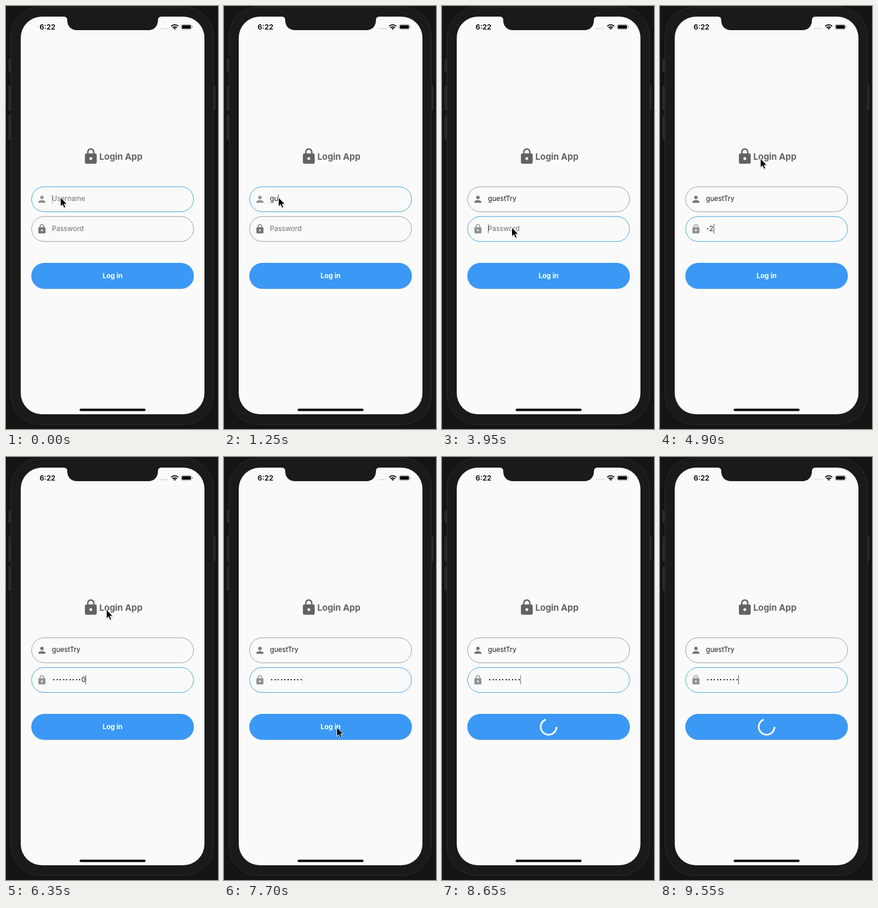
Recreate the animation shown at these times as an HTML page. Size 360 by 718 pixels, loop 9.6 s.

```html
<!DOCTYPE html>
<html lang="en">
<head>
<meta charset="utf-8">
<title>Login App</title>
<style>
  html, body { margin: 0; width: 100%; height: 100%; overflow: hidden; background: #151515; }
  #stage { position: relative; width: 360px; height: 718px; overflow: hidden; font: 11.65px Inter, Roboto, sans-serif; }
  #stage > svg { position: absolute; left: 0; top: 0; }
  text { font-weight: 700; }
  .loop { animation: 9600ms linear infinite; }

  .line { position: absolute; left: 78px; height: 43px; line-height: 43px; display: flex; align-items: center; white-space: pre; color: #1f1f1f; }
  #user { top: 306px; }
  #pass { top: 356.5px; }
  .hint { color: #707070; }
  .dot { width: 5.55px; height: 2.2px; background: radial-gradient(circle at 3px 1.1px, #222 .8px, transparent 1.3px); }
  .caret { width: 1px; height: 16px; margin-right: -1px; background: #555; animation-name: blink; }
  .hint + .caret { position: absolute; left: 0; }

  #box1, #box2 { fill: none; stroke-width: 1; }
  #box1 { animation-name: blurBox; }
  #box2 { animation-name: focusBox; }
  #icon1 { animation-name: blurIcon; }
  #icon2 { animation-name: focusIcon; }
  #shade { animation-name: lift; }
  #label { animation-name: hide; }
  #ring { animation-name: show; }
  #arc { animation: spin 900ms linear infinite; transform-origin: 181px 458px; }
  #mouse { animation-name: roam; }
  #mouse g { animation-name: hide; }

  @keyframes blurBox { 0%, 37.5% { stroke: #4aa5dc } 39.6%, 100% { stroke: #a0a0a0 } }
  @keyframes focusBox { 0%, 37.5% { stroke: #a0a0a0 } 39.6%, 100% { stroke: #4aa5dc } }
  @keyframes blurIcon { 0%, 37.5% { fill: #929292 } 39.6%, 100% { fill: #757575 } }
  @keyframes focusIcon { 0%, 37.5% { fill: #757575 } 39.6%, 100% { fill: #929292 } }
  @keyframes lift { 0%, 85.4% { opacity: 0 } 86.5%, 88% { opacity: .2 } 90%, 100% { opacity: 0 } }
  @keyframes hide { 0%, 86.9% { opacity: 1 } 86.91%, 100% { opacity: 0 } }
  @keyframes show { 0%, 86.9% { opacity: 0 } 86.91%, 100% { opacity: 1 } }
  @keyframes spin { from { transform: rotate(-220deg) } to { transform: rotate(140deg) } }
  @keyframes blink {
    0%, 2.6% { opacity: .45 }
    4.7%, 7.3% { opacity: 0 }
    9.4%, 26.3% { opacity: 1 }
    28.6%, 31.2% { opacity: 0 }
    33.3%, 34.4% { opacity: 1 }
    36%, 37.4% { opacity: 0 }
    37.5%, 40.6% { opacity: 1 }
    42.7%, 45.3% { opacity: 0 }
    47.4%, 67.7% { opacity: 1 }
    70.3%, 72.9% { opacity: 0 }
    75%, 78.1% { opacity: 1 }
    80.7%, 81.25% { opacity: 0 }
    83.3%, 89.6% { opacity: 1 }
    91.7%, 94.2% { opacity: 0 }
    96.4%, 100% { opacity: .9 }
  }
  @keyframes roam {
    0%, 26.04% { transform: translate(92px, 325px) }
    27.08% { transform: translate(119px, 354px); animation-timing-function: ease-out }
    35.9%, 42.7% { transform: translate(118px, 376px); animation-timing-function: ease-in-out }
    47.9%, 66.67% { transform: translate(170px, 259px); animation-timing-function: ease-in-out }
    70.8% { transform: translate(278px, 473px); animation-timing-function: ease-in-out }
    73.4% { transform: translate(196px, 471px); animation-timing-function: ease-out }
    76%, 100% { transform: translate(191px, 459px) }
  }
</style>
</head>
<body>
<div id="stage">
  <svg width="360" height="718" viewBox="0 0 360 718">
    <defs>
      <path id="lock" d="M18 8h-1V6c0-2.76-2.24-5-5-5S7 3.24 7 6v2H6c-1.1 0-2 .9-2 2v10c0 1.1.9 2 2 2h12c1.1 0 2-.9 2-2V10c0-1.1-.9-2-2-2zm-6 9c-1.1 0-2-.9-2-2s.9-2 2-2 2 .9 2 2-.9 2-2 2zm3.1-9H8.9V6c0-1.71 1.39-3.1 3.1-3.1 1.71 0 3.1 1.39 3.1 3.1v2z"/>
      <path id="person" d="M12 12c2.21 0 4-1.79 4-4s-1.79-4-4-4-4 1.79-4 4 1.79 4 4 4zm0 2c-2.67 0-8 1.34-8 4v2h16v-2c0-2.66-5.33-4-8-4z"/>
    </defs>

    <!-- phone -->
    <rect width="360" height="718" fill="#141414"/>
    <g fill="#292929" stroke="#0b0b0b">
      <rect x="3.5" y="89" width="6" height="24" rx="1"/>
      <rect x="3.5" y="134" width="6" height="44" rx="1"/>
      <rect x="3.5" y="184" width="6" height="44" rx="1"/>
      <rect x="350.5" y="134" width="6" height="44" rx="1"/>
    </g>
    <rect x="8.5" y="1.5" width="344" height="709" rx="50" fill="#1a1a1a" stroke="#2b2b2b"/>
    <rect x="25" y="18" width="312" height="675" rx="36" fill="#fafafa"/>
    <path fill="#1a1a1a" d="M98 17H264V18Q258 18 258 24C258 34 252 41 241 41H121C110 41 104 34 104 24Q104 18 98 18Z"/>

    <!-- status bar -->
    <text x="57" y="40" font-size="12.2" style="font-weight:600">6:22</text>
    <path d="M263 38.5h13" stroke="#c4c4c4" stroke-width="2.2" stroke-linecap="round" stroke-dasharray="0 3.7"/>
    <g fill="none" stroke="#000" stroke-width="1.9">
      <path d="M280.6 34.4a8.2 8.2 0 0 1 11.8 0"/>
      <path d="M282.9 37a5 5 0 0 1 7.2 0"/>
    </g>
    <path d="M286.5 40.3l-2-2.1a2.9 2.9 0 0 1 4 0z"/>
    <rect x="297.5" y="31.3" width="17.6" height="8.4" rx="2.4" fill="none" stroke="#9a9a9a" stroke-width=".8"/>
    <rect x="298.7" y="32.4" width="15.2" height="6.2" rx="1.3"/>
    <path d="M316 34v3q1.2-.4 1.2-1.5T316 34z" fill="#9a9a9a"/>
    <rect x="125" y="683.5" width="112" height="4" rx="2"/>

    <!-- form -->
    <use href="#lock" transform="translate(129 240.3) scale(1.25)" fill="#636363"/>
    <text x="158.5" y="260.6" font-size="14.8" fill="#636363">Login App</text>
    <rect id="box1" class="loop" x="43.5" y="306.8" width="275" height="42.4" rx="21.2"/>
    <rect id="box2" class="loop" x="43.5" y="357.3" width="275" height="42.4" rx="21.2"/>
    <g id="icon1" class="loop"><use href="#person" transform="translate(52 319) scale(.75)"/></g>
    <g id="icon2" class="loop"><use href="#lock" transform="translate(52 369.4) scale(.75)"/></g>
    <rect id="shade" class="loop" x="43" y="440" width="276" height="44" rx="22"/>
    <rect x="43" y="437" width="276" height="43.6" rx="21.8" fill="#c3ccd5"/>
    <rect x="43" y="436" width="276" height="44" rx="22" fill="#3b98f4"/>
    <text id="label" class="loop" x="181" y="462" text-anchor="middle" fill="#fff">Log in</text>
    <g id="ring" class="loop">
      <path id="arc" d="M194.4 458A13.4 13.4 0 1 1 176 445.6" fill="none" stroke="#fff" stroke-width="2.8"/>
    </g>
  </svg>

  <div id="user" class="line"></div>
  <div id="pass" class="line"></div>

  <svg width="360" height="718" viewBox="0 0 360 718">
    <g id="mouse" class="loop">
      <g class="loop">
        <path d="M1 2v15l3.5-3 2.6 5.6 3-1.3-2.5-5.3h5z" fill="#000" opacity=".15"/>
        <path d="M.5 0v15.2l3.5-3.2 2.5 5.6 2.6-1.1-2.4-5.4h4.8z" fill="#000" stroke="#fff" stroke-width=".9"/>
      </g>
    </g>
  </svg>
</div>
<script>
  const LOOP = 9600, FOCUS = 3600, MASK = 7500;
  const name = "guestTry", nameTimes = [1050, 1250, 1500, 1700, 1900, 2100, 2250, 2400];
  const code = "1234567890", codeTimes = [4650, 4850, 5000, 5150, 5300, 5500, 5700, 6050, 6200, 6350];
  const user = document.getElementById("user"), pass = document.getElementById("pass");
  const caret = document.createElement("i");
  caret.className = "caret loop";

  const typed = (times, t) => times.filter(k => k <= t).length;
  const hint = s => `<span class="hint">${s}</span>`;
  const plain = s => `<span>${s}</span>`;

  function secret(n, masked) {
    const dots = masked ? n : n - 1;
    return '<span class="dot"></span>'.repeat(dots) + (masked ? "" : plain(code[n - 1]));
  }

  // Each field keeps its text apart from the caret so the blink never restarts.
  function fill(field, html) {
    if (field.shown === html) return;
    field.shown = html;
    [...field.children].forEach(el => el !== caret && el.remove());
    field.insertAdjacentHTML("afterbegin", html);
  }

  const start = performance.now();
  user.append(caret);
  const blink = caret.getAnimations()[0];

  function draw(now) {
    const t = Math.max(0, now - start) % LOOP;
    const n = typed(nameTimes, t), m = typed(codeTimes, t);
    const active = t < FOCUS ? user : pass;
    if (caret.parentNode !== active) {
      active.append(caret);
      caret.style.animationDelay = -t + "ms";
    }
    fill(user, n ? plain(name.slice(0, n)) : hint("Username"));
    fill(pass, m ? secret(m, t >= MASK) : hint("Password"));
    requestAnimationFrame(draw);
  }
  draw(start);
</script>
</body>
</html>
```
